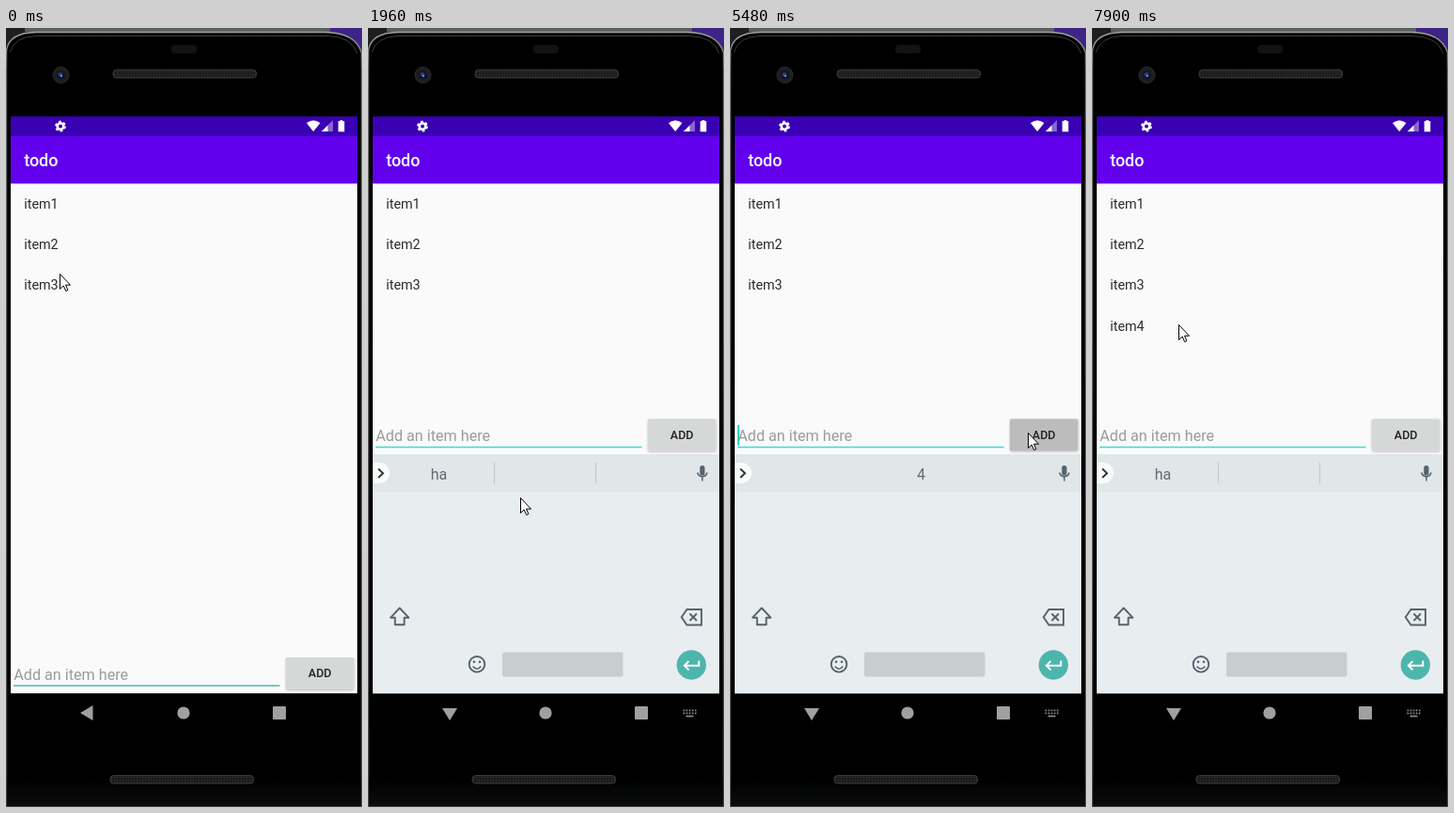
Write an HTML page that moves like this. It is 379 px wide and 828 px high and loops after 8 s.

```html
<!DOCTYPE html>
<html lang="en">
<head>
<meta charset="utf-8">
<title>todo</title>
<style>
  html, body { margin: 0; width: 100%; height: 100%; overflow: hidden; background: #000; }
  svg { display: block; width: 379px; height: 828px; font-family: Roboto, sans-serif; }
  .list { font-size: 14.37px; fill: #2b2b2b; }
  .title { font-size: 17.96px; font-weight: 500; fill: #fff; }
  .field { font-size: 16.17px; fill: #212121; }
  .typed { text-decoration: underline; }
  .add { font-size: 12.57px; font-weight: 500; fill: #222; text-anchor: middle; }
  .hint { fill: #9b9b9b; }
  .word { font-size: 16px; fill: #616b71; text-anchor: middle; }
  .toast { font-size: 12.57px; fill: #2b2b2b; text-anchor: middle; }
  .line { fill: none; stroke: #55636b; stroke-width: 1.9; }
  .thin { stroke-width: 1.5; }
  .chevron { stroke: #30383c; }
</style>
</head>
<body>
<svg viewBox="0 0 379 828">
  <defs>
    <linearGradient id="rim" x1="0" y1="0" x2="0" y2="1">
      <stop offset="0" stop-color="#a3a6a4"/>
      <stop offset=".05" stop-color="#5c5f5d"/>
      <stop offset="1" stop-color="#3c3e3d"/>
    </linearGradient>
    <linearGradient id="chin" x1="0" y1="0" x2="0" y2="1">
      <stop offset="0" stop-color="#000"/>
      <stop offset="1" stop-color="#0d0e0e"/>
    </linearGradient>
    <pattern id="mesh" width="3" height="3" patternUnits="userSpaceOnUse">
      <rect width="3" height="3" fill="#1b1b1b"/>
      <circle cx="1.5" cy="1.5" r=".8" fill="#333"/>
    </pattern>
    <filter id="shadow" x="-10%" y="-20%" width="120%" height="150%">
      <feDropShadow dx="0" dy="1" stdDeviation="1" flood-opacity=".28"/>
    </filter>
    <clipPath id="screen"><rect x="5" y="94" width="369" height="613.2"/></clipPath>
  </defs>

  <!-- Device -->
  <rect width="379" height="828" fill="#1d1f20"/>
  <rect x="20" width="325" height="4" fill="#5a6061"/>
  <path d="M345 0H379V26Q372 5 345 4Z" fill="#3f2488"/>
  <path d="M.5 827.5V24Q3 5 32 4.5H340Q372 5 378.5 26V827.5Z" fill="#000" stroke="url(#rim)" stroke-width="1.4"/>
  <path d="M4 26Q9 9 32 8.500H342Q368 9 374 27" fill="none" stroke="#3a3c3b"/>
  <rect x="1.500" y="800" width="376" height="27" fill="url(#chin)"/>
  <rect x="176" y="18" width="27" height="9" rx="4" fill="#131313"/>
  <circle cx="58.5" cy="50" r="8.5" fill="#1e1e20" stroke="#2b2b2d"/>
  <circle cx="58.5" cy="50" r="4.5" fill="#101426"/>
  <circle cx="58" cy="49.5" r="2.3" fill="#2f3f88"/>
  <circle cx="59" cy="51" r="1" fill="#8c9bd2"/>
  <g fill="url(#mesh)" stroke="#3b3b3b">
    <rect x="114" y="44.5" width="152.5" height="8.5" rx="3.5"/>
    <rect x="111" y="794.5" width="152.5" height="8.5" rx="3.5"/>
  </g>

  <!-- Status and title bars -->
  <rect x="5" y="94" width="369" height="613.2" fill="#fafafa"/>
  <rect x="5" y="115" width="369" height="50.4" fill="#6200ee"/>
  <rect x="5" y="94" width="369" height="21" fill="#3a00b3"/>
  <g fill="none" stroke="#fff">
    <circle cx="58" cy="104.5" r="3.3" stroke-width="2.6"/>
    <circle cx="58" cy="104.5" r="5" stroke-width="1.8" stroke-dasharray="2.7 2.536"/>
  </g>
  <g fill="#fff">
    <path d="M320 101Q327.200 95.500 334.500 101L327.200 110Z"/>
    <path d="M348 98V110H336Z" opacity=".4"/>
    <path d="M342.500 103.500V110H336Z"/>
    <path d="M355.500 99V98H358.500V99H360.300V110.300H353.700V99Z"/>
  </g>
  <text class="title" x="19.2" y="147">todo</text>
  <g class="list" id="list"></g>

  <!-- Input row -->
  <g id="row">
    <text class="field hint" id="hint" x="8.3" y="692.5">Add an item here</text>
    <text class="field typed" id="typed" x="8.3" y="692.5"></text>
    <rect id="underline" x="8" y="698.3" width="283.5" height="1.5"/>
    <rect id="caret" y="675.5" width="1.8" height="21.5" fill="#20cdbb"/>
    <rect id="button" x="298" y="669" width="72.5" height="34" rx="1.5" filter="url(#shadow)"/>
    <text class="add" x="334.2" y="690">ADD</text>
  </g>

  <!-- Keyboard -->
  <g clip-path="url(#screen)">
    <g id="keyboard">
      <rect x="5" y="453" width="369" height="255" fill="#e8edf0"/>
      <rect x="5" y="453" width="369" height="40" fill="#e1e6e9"/>
      <path d="M5 462H12A11 11 0 0 1 12 484H5Z" fill="#fafcfc"/>
      <path class="line chevron" d="M11 468.500L16 473.200L11 478"/>
      <path id="dividers" d="M134.500 462V484M242.500 462V484" stroke="#c2c8cb" stroke-width="1.2"/>
      <g class="word">
        <text id="left" x="75.5" y="479.5"></text>
        <text id="mid" x="203.5" y="479.5"></text>
        <text id="right" x="305.5" y="479.5"></text>
      </g>
      <rect x="353.3" y="465" width="5.2" height="10.5" rx="2.6" fill="#55636b"/>
      <path class="line thin" d="M350.800 472.500A5.200 5.200 0 0 0 361 472.500M355.900 477.500V481.500"/>
      <path class="line" d="M33.700 616.500L43.300 626.700H38.600V634.300H28.800V626.700H24.100Z" stroke-linejoin="round"/>
      <path class="line" d="M339.500 618H355V634.500H339.500L333.800 626.200ZM342.500 622.500L350 630M350 622.500L342.500 630"/>
      <circle class="line" cx="116" cy="676.3" r="8.3"/>
      <path class="line thin" d="M111.700 678.500Q116 684 120.300 678.500"/>
      <g fill="#55636b"><circle cx="113" cy="673.8" r="1.3"/><circle cx="119" cy="673.8" r="1.3"/></g>
      <rect x="143" y="663.5" width="128.5" height="26" rx="2" fill="#c8cdd0"/>
      <circle cx="344.3" cy="677" r="15.7" fill="#4db6ac"/>
      <path d="M352.300 672.500V677.700H337M341.500 673L336.800 677.700L341.500 682.400" fill="none" stroke="#fff" stroke-width="1.9"/>
    </g>
  </g>

  <g id="toast">
    <rect x="122" y="641" width="134.5" height="44.3" rx="22" fill="#e9ebec"/>
    <text class="toast" x="189.3" y="668">Item was added</text>
  </g>

  <!-- Navigation -->
  <g fill="#a0a0a0">
    <path id="back" d="M79 728L92.500 720V736Z"/>
    <path id="down" d="M79 723H95L87 736Z"/>
    <circle cx="189" cy="728" r="6.6"/>
    <rect x="284" y="721" width="14" height="14" rx="1"/>
  </g>
  <g id="switcher" stroke="#8b8b8b" stroke-width="1.7">
    <path d="M335.500 725.300H350M335.500 728.300H350" stroke-dasharray="1.7 1.4"/>
    <path d="M338.500 731.500H346.500"/>
  </g>

  <path id="pointer" d="M.5 .5V16.500L4.200 13L6.700 18.600L8.900 17.600L6.500 12.200H11.500Z" fill="#fff" stroke="#000"/>
</svg>

<script>
  const LOOP = 8000, FRAME = 130, KEY_DELAY = 123, BLINK = 480;
  const navChange = 1690, opened = 1810, settled = 1960;
  const firstKey = 2750, lastLetter = 3120, digitKey = 3670, pressed = 5480, added = 5600;

  const el = id => document.getElementById(id);
  const show = (id, on) => el(id).style.display = on ? '' : 'none';
  const clamp = v => Math.min(1, Math.max(0, v));
  const easeOut = p => 1 - (1 - p) ** 3;

  // Pointer strokes: when each one starts and ends, and where it leads.
  const home = [57, 261];
  const strokes = [
    { from: 150, to: 730, end: [58, 665] },
    { from: 1810, to: 1960, end: [162, 499] },
    { from: 2080, to: 2200, end: [170, 499] },
    { from: 4510, to: 4870, end: [274, 475] },
    { from: 5020, to: 5170, end: [317, 430] },
    { from: 5840, to: 6080, end: [195, 362] },
    { from: 6490, to: 6730, end: [278, 655] },
    { from: 6880, to: 7120, end: [296, 745] },
    { from: 7420, to: 7900, end: [92, 315] }
  ];

  // The screen refreshes in coarse frames, so each stroke advances in steps.
  function pointerAt(t) {
    let point = home;
    for (const { from, to, end } of strokes) {
      if (t < from) break;
      const gaps = Math.round((to - from) / FRAME);
      const step = Math.floor((t - from) / (to - from) * gaps) + 1;
      const p = easeOut(clamp(step / (gaps + 1)));
      point = point.map((v, i) => v + (end[i] - v) * p);
    }
    return point;
  }

  function textAt(t) {
    if (t < firstKey || t >= pressed) return '';
    if (t >= digitKey) return 'item4';
    return 'item'.slice(0, Math.floor((t - firstKey) / KEY_DELAY) + 1);
  }

  function suggestionsAt(t, text) {
    if (t >= digitKey && t < added) return ['', '4', ''];
    if (text === 'item') return ['', '3', '2'];
    return [text ? '' : 'ha', '', ''];
  }

  // Every key press restarts the blink.
  function caretAt(t) {
    const restart = [digitKey, lastLetter, firstKey].find(time => time <= t) ?? BLINK / 2;
    return Math.floor((t - (t >= pressed ? pressed : restart)) / BLINK) % 2 === 0;
  }

  function draw(t) {
    const raised = t >= opened, entering = t < settled;
    const text = textAt(t);
    const suggestions = suggestionsAt(t, text);

    el('pointer').setAttribute('transform', `translate(${pointerAt(t).map(Math.round)})`);
    el('row').setAttribute('transform', `translate(0 ${raised ? -253.5 : 0})`);
    el('underline').setAttribute('fill', raised ? '#35dfd0' : '#4fb9ae');
    el('button').setAttribute('fill', t >= pressed && t < added + FRAME ? '#bcbcbc' : '#d6d7d7');
    el('typed').textContent = text;
    show('hint', !text);
    el('caret').setAttribute('x', 8 + (text ? el('typed').getComputedTextLength() - .6 : 0));
    show('caret', caretAt(t));
    show('item4', t >= added);

    show('keyboard', raised);
    el('keyboard').setAttribute('opacity', entering ? .6 : 1);
    el('keyboard').setAttribute('transform', `translate(0 ${entering ? 20 : 0})`);
    ['left', 'mid', 'right'].forEach((id, i) => el(id).textContent = suggestions[i]);
    show('dividers', suggestions[1] !== '4');
    el('toast').setAttribute('opacity', clamp((t - added) / 300) * clamp((LOOP - 100 - t) / 400));

    show('back', t < navChange);
    show('down', t >= navChange);
    show('switcher', t >= navChange);
  }

  for (let i = 1; i <= 4; i++) {
    el('list').insertAdjacentHTML('beforeend',
      `<text id="item${i}" x="19.2" y="${149.3 + 43.05 * i}">item${i}</text>`);
  }

  const start = performance.now();
  function tick() {
    draw((performance.now() - start) % LOOP);
    requestAnimationFrame(tick);
  }
  tick();
</script>
</body>
</html>
```
